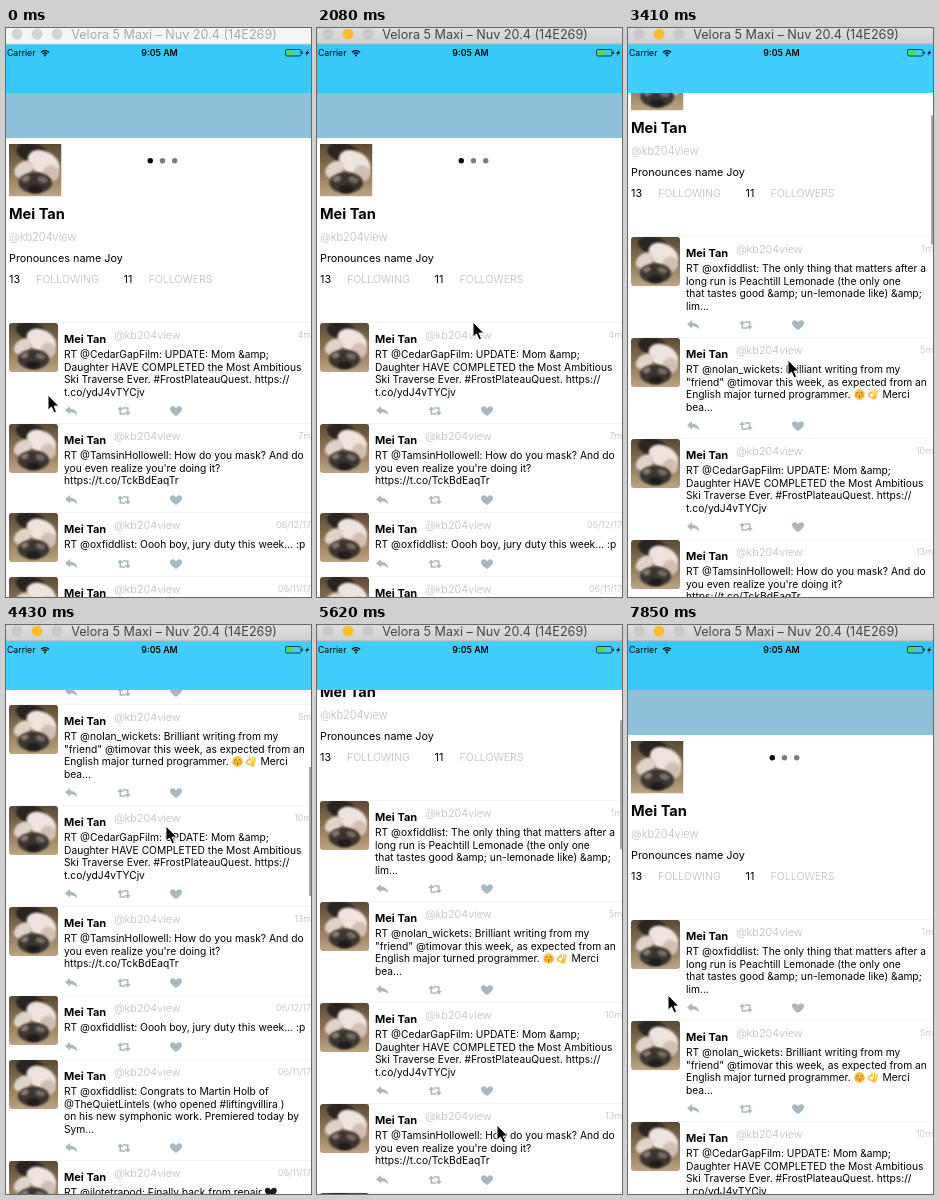
Animation, 305 px wide and 569 px high, one loop 7.99 s. Source, as an HTML page with a canvas:

```html
<!DOCTYPE html>
<html lang="en">
<head>
<meta charset="utf-8">
<title>Profile timeline</title>
<style>
html, body { margin: 0; width: 100%; height: 100%; overflow: hidden; background: #fff; }
canvas { display: block; width: 305px; height: 569px; }
</style>
</head>
<body>
<canvas id="stage"></canvas>
<script>
const W = 305, H = 569, LOOP = 7990, HOLD = 450, STEP = 147.2, LAST = 50;
const NAV_BOTTOM = 65, FIRST_ROW = 295;
const USER = 'Mei Tan', HANDLE = '@kb204view';
const ICON = '#aab8c2', PALE = '#bcbcbc';

const canvas = document.getElementById('stage');
const ctx = canvas.getContext('2d');
const dpr = window.devicePixelRatio || 1;
canvas.width = W * dpr;
canvas.height = H * dpr;

const row = (time, height, ...lines) => ({ time, height, lines });

const fresh = [
  row('1m', 101, 'RT @oxfiddlist: The only thing that matters after a',
    'long run is Peachtill Lemonade (the only one',
    'that tastes good &amp; un-lemonade like) &amp;', 'lim...'),
  row('5m', 101, 'RT @nolan_wickets: Brilliant writing from my',
    '"friend" @timovar this week, as expected from an',
    'English major turned programmer. ☺☝ Merci', 'bea...')
];
const film = ['RT @CedarGapFilm: UPDATE: Mom &amp;',
  'Daughter HAVE COMPLETED the Most Ambitious',
  'Ski Traverse Ever. #FrostPlateauQuest. https://', 't.co/ydJ4vTYCjv'];
const mask = ['RT @TamsinHollowell: How do you mask? And do',
  "you even realize you're doing it?", 'https://t.co/TckBdEaqTr'];
const older = [
  row('06/12/17', 64, 'RT @oxfiddlist: Oooh boy, jury duty this week... :p'),
  row('06/11/17', 101, 'RT @oxfiddlist: Congrats to Martin Holb of',
    '@TheQuietLintels (who opened #liftingvillira )',
    'on his new symphonic work. Premiered today by', 'Sym...'),
  row('06/11/17', 64, 'RT @ilotetrapod: Finally back from repair ♥')
];
const before = [row('4m', 101, ...film), row('7m', 89, ...mask), ...older];
const after = [...fresh, row('10m', 101, ...film), row('13m', 89, ...mask), ...older];
const REFRESH = 16, ACTIVATE = 9;

// Keys: [step, value...]
const scrollKeys = [[-1, 0], [11, 0], [15, -58], [16, -22], [17, 6], [20, 86], [23, 196],
  [24, 214], [27, 316], [29, 342], [30, 342], [31, 318], [35, 119], [38, 50], [39, 30],
  [40, 7], [41, -6], [42, -4], [45, -2], [48, 0]];
const cursorKeys = [[-1, 42, 367], [0, 46, 360], [3, 118, 228], [7, 201, 121], [8, 190, 160],
  [11, 156, 294], [15, 160, 418], [20, 160, 332], [23, 160, 232], [27, 160, 201],
  [30, 160, 201], [31, 166, 318], [35, 180, 500], [38, 166, 484], [42, 92, 407],
  [47, 45, 372], [50, 40, 370]];

function at(keys, k) {
  let i = 1;
  while (i < keys.length - 1 && keys[i][0] < k) i++;
  const a = keys[i - 1], b = keys[i];
  const p = Math.min(1, Math.max(0, (k - a[0]) / (b[0] - a[0])));
  return a.slice(1).map((v, j) => v + (b[j + 1] - v) * p);
}

function text(str, x, y, size, color = '#000', weight = 400, align = 'left') {
  ctx.font = `${weight} ${size}px Inter, "Liberation Sans", sans-serif`;
  ctx.fillStyle = color;
  ctx.textAlign = align;
  ctx.fillText(str, x, y);
}

function rect(x, y, w, h, color) {
  ctx.fillStyle = color;
  ctx.fillRect(x, y, w, h);
}

function oval(x, y, rx, ry, color, turn = 0) {
  ctx.fillStyle = color;
  ctx.beginPath();
  ctx.ellipse(x, y, rx, ry, turn, 0, 7);
  ctx.fill();
}

const dot = (x, y, r, color) => oval(x, y, r, r, color);

function shape(d, x, y, fill, stroke, width = 1) {
  const path = new Path2D(d);
  ctx.save();
  ctx.translate(x, y);
  if (fill) {
    ctx.fillStyle = fill;
    ctx.fill(path);
  }
  if (stroke) {
    ctx.strokeStyle = stroke;
    ctx.lineWidth = width;
    ctx.stroke(path);
  }
  ctx.restore();
}

const HEART = 'M0 5C-3 3-6 .5-6-2C-6-5.5-1.5-5.8 0-2.6C1.5-5.8 6-5.5 6-2C6 .5 3 3 0 5Z';
const REPLY = 'M-6-.7L-1-5V-2.3C3-2.3 6-.2 6.3 4.5C4.5 2 2.5 1.2-1 1.2V3.6Z';
const BOLT = 'M2.5-3.5L-1.5.7H.5L-.8 3.5L2.8-.8H.8Z';

function retweet(x, y) {
  shape('M-3.8-2V3H1.5M3.8 2V-3H-1.5', x, y, null, ICON, 1.5);
  shape('M-3.8-4.6L-6.8-1H-.8ZM3.8 4.6L.8 1H6.8Z', x, y, ICON);
}

function kissFace(x, y) {
  dot(x, y, 5.3, '#fdc63a');
  dot(x - 2.9, y + 1.2, 1.3, '#f38b5b');
  dot(x + 2.9, y + 1.2, 1.3, '#f38b5b');
  shape('M-3-1.2Q-2-2.4-1-1.2M1-1.2Q2-2.4 3-1.2M-.4 1Q1.2 1.6 0 2.3Q1.2 2.9-.4 3.5', x, y, null, '#70421b', .9);
}

function okHand(x, y) {
  shape('M.2 0L-.8-4.8M2.2 0V-5M4 1L4.6-3.8', x, y, null, '#fbc540', 1.5);
  oval(x + 1.6, y + 2.6, 2.6, 2.8, '#fbc540');
  oval(x - 1.4, y + .6, 1.9, 2, '#fff');
  shape('M.4-1.2A2.2 2.2 0 1 0 .4 2.6', x - 1, y, null, '#f2b233', 1.4);
}

// Draws a line in which ☺ ☝ ♥ stand for small pictures.
function richLine(line, x, y) {
  for (const part of line.split(/([☺☝♥])/)) {
    if (part === '☺') kissFace(x + 6, y - 3.8);
    else if (part === '☝') okHand(x + 6, y - 3.8);
    else if (part === '♥') shape(HEART, x + 6, y - 3.4, '#1c1c1c');
    else {
      text(part, x, y, 10.25);
      x += ctx.measureText(part).width;
      continue;
    }
    x += 13;
  }
}

// Soft stand-in for a pet photo.
function photo(x, y, size, radius) {
  ctx.save();
  ctx.translate(x, y);
  ctx.scale(size / 50, size / 50);
  ctx.beginPath();
  ctx.roundRect(0, 0, 50, 50, radius);
  ctx.clip();
  const g = ctx.createLinearGradient(0, 0, 0, 50);
  g.addColorStop(0, '#5b4a35');
  g.addColorStop(.5, '#8c7354');
  g.addColorStop(1, '#bda583');
  rect(0, 0, 50, 50, g);
  ctx.filter = 'blur(1px)';
  oval(22, 8, 15, 9, '#2a2420', .2);
  oval(33, 18, 16, 11, '#eee4de', .5);
  oval(14, 24, 10, 7, '#dfd2c8', -.6);
  oval(40, 28, 8, 8, '#d3bfb2', .3);
  oval(25, 37, 16, 10, '#3a3530');
  oval(16, 33, 4, 3, '#857b71', -.4);
  oval(32, 34, 5, 3, '#756c63', .3);
  oval(25, 43, 7, 4, '#1f1c1a');
  ctx.restore();
}

function tweet(item, y) {
  rect(11, y - 1, W - 11, .7, '#efefef');
  photo(3, y, 49, 3);
  text(USER, 58, y + 20.3, 11, '#000', 700);
  text(HANDLE, 108, y + 16, 10.9, PALE, 300);
  text(item.time, 305, y + 15, 9, PALE, 300, 'right');
  item.lines.forEach((line, i) => richLine(line, 58, y + 35 + i * 12.6));
  const base = y + item.height - 13;
  shape(REPLY, 65, base, ICON);
  retweet(118, base);
  shape(HEART, 170, base, ICON);
}

function profile(s) {
  rect(0, NAV_BOTTOM, W, Math.max(0, 110 - s - NAV_BOTTOM), '#8fc0da');
  photo(3, 116 - s, 52.5, 0);
  ['#000', '#7c7c7c', '#7c7c7c'].forEach((c, i) => dot(144.3 + i * 12.2, 132.7 - s, 2.7, c));
  text(USER, 3, 190.8 - s, 14.6, '#000', 700);
  text(HANDLE, 3, 212.5 - s, 11, PALE, 300);
  text('Pronounces name Joy', 3, 233.5 - s, 10.8);
  text('13', 3, 254.7 - s, 10.8);
  text('FOLLOWING', 30, 254.7 - s, 10.6, PALE, 300);
  text('11', 117.5, 254.7 - s, 10.8);
  text('FOLLOWERS', 142.5, 254.7 - s, 10.6, PALE, 300);
}

function navBar(s) {
  const p = Math.min(1, Math.max(0, s / 60));
  rect(0, 16, W, NAV_BOTTOM - 16, `rgb(${54 + 10 * p}, ${201 + 5 * p}, ${248 + 5 * p})`);
  text('Carrier', 1, 28, 8.7);
  dot(39, 27.4, 1, '#000');
  for (const r of [3, 5.4]) {
    ctx.beginPath();
    ctx.arc(39, 28, r, -Math.PI * .76, -Math.PI * .24);
    ctx.strokeStyle = '#000';
    ctx.lineWidth = 1.3;
    ctx.stroke();
  }
  text('9:05 AM', 153.5, 28, 8.8, '#000', 600, 'center');
  ctx.beginPath();
  ctx.roundRect(279.5, 21.5, 15.5, 6.5, 1.5);
  ctx.lineWidth = .7;
  ctx.stroke();
  rect(280.5, 22.5, 7.5, 4.5, '#55d657');
  rect(295.7, 23.6, 1, 2.4, '#000');
  shape(BOLT, 300.5, 24.8, '#000');
}

function titleBar(active) {
  const g = ctx.createLinearGradient(0, 0, 0, 16);
  g.addColorStop(0, active ? '#dedede' : '#f6f6f6');
  g.addColorStop(1, active ? '#d0d0d0' : '#f6f6f6');
  rect(0, 0, W, 16, g);
  rect(0, 15.5, W, 1, active ? '#b0b0b0' : '#d6d6d6');
  const off = active ? '#c9c9c9' : '#d4d4d4';
  [off, active ? '#fdbd2e' : off, off].forEach((c, i) => dot(11 + i * 20, 6, 5.5, c));
  text('Velora 5 Maxi – Nuv 20.4 (14E269)', 168, 10.8, 12.6, active ? '#454545' : '#a9a9a9', 400, 'center');
}

function scrollBar(s, k) {
  if (k < 12 || k > 48) return;
  ctx.globalAlpha = k > 46 ? .4 : 1;
  rect(303, 67 + Math.max(0, s) * .237, 2, 129, '#a9a9a9');
  ctx.globalAlpha = 1;
}

function draw(k) {
  const [s] = at(scrollKeys, k);
  const [cx, cy] = at(cursorKeys, k);
  ctx.setTransform(dpr, 0, 0, dpr, 0, 0);
  rect(0, 0, W, H, '#fff');

  ctx.save();
  ctx.beginPath();
  ctx.rect(0, NAV_BOTTOM, W, H - NAV_BOTTOM);
  ctx.clip();
  profile(s);
  let y = FIRST_ROW - s;
  for (const item of k < REFRESH ? before : after) {
    if (y < H && y + item.height > NAV_BOTTOM) tweet(item, y);
    y += item.height;
  }
  scrollBar(s, k);
  ctx.restore();

  navBar(s);
  titleBar(k >= ACTIVATE);
  shape('M0 0V15.2L3.5 12L6 17.8L8.6 16.7L6.1 11.1H10.8Z', cx, cy, '#000', '#fff', 1);
}

function tick(now) {
  const t = now % LOOP;
  draw(t < HOLD ? -1 : Math.min(LAST, Math.floor((t - HOLD) / STEP)));
  requestAnimationFrame(tick);
}
requestAnimationFrame(tick);
</script>
</body>
</html>
```
